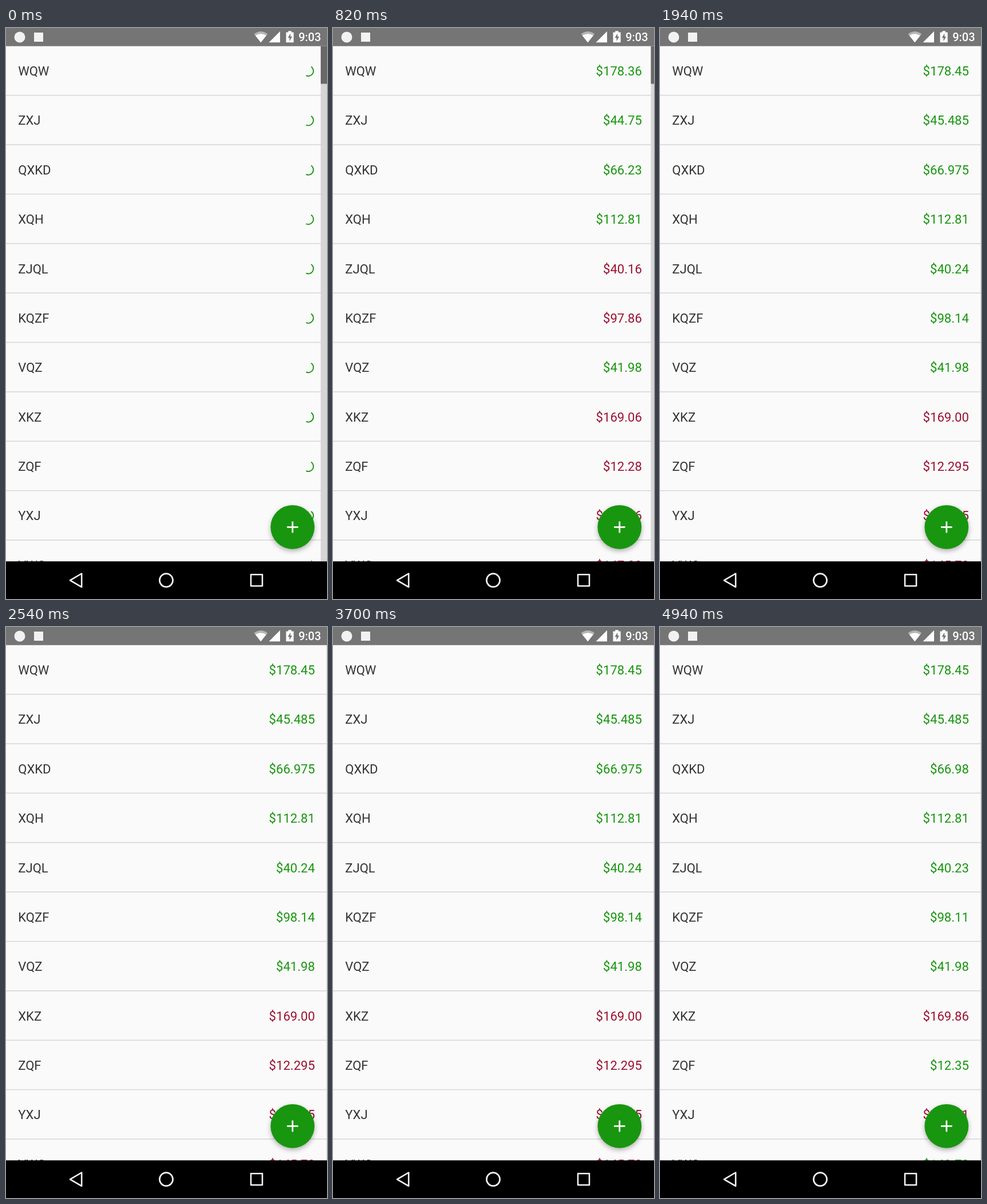
Animation, 561 px wide and 998 px high, one loop 5400 ms. Source, as an HTML page with a canvas:

```html
<!DOCTYPE html>
<html lang="en">
<head>
<meta charset="utf-8">
<title>Quotes</title>
<style>
  html, body { margin: 0; width: 100%; height: 100%; overflow: hidden; background: #000; }
  canvas { display: block; }
</style>
</head>
<body>
<canvas id="stage" width="561" height="998"></canvas>
<script>
const ctx = document.getElementById('stage').getContext('2d');
const LOOP = 5400, PITCH = 86.38, LIST_TOP = 31.5, LIST_BOTTOM = 932.4;
const GREEN = '#18960f', RED = '#9c1030';

// Symbol, then first quote and its two updates; the sign gives the colour.
const rows = `
WQW +178.36 +178.45 +178.45
ZXJ +44.75 +45.485 +45.485
QXKD +66.23 +66.975 +66.98
XQH +112.81 +112.81 +112.81
ZJQL -40.16 +40.24 +40.23
KQZF -97.86 +98.14 +98.11
VQZ +41.98 +41.98 +41.98
XKZ -169.06 -169.00 -169.86
ZQF -12.28 -12.295 +12.35
YXJ -112.16 -111.95 -112.01
VWQ -147.33 -145.70 +149.78`.trim().split('\n').map(line => line.split(' '));
const updateStarts = [60, 1300, 4500], STAGGER = 32;

const clamp = v => Math.max(0, Math.min(1, v));
const mix = (a, b, p) => a + (b - a) * p;

function rect(x, y, w, h, color) {
  ctx.fillStyle = color;
  ctx.fillRect(x, y, w, h);
}

function text(str, x, y, color, align = 'left', font = '22.1px Roboto, sans-serif') {
  ctx.font = font;
  ctx.textAlign = align;
  ctx.fillStyle = color;
  ctx.fillText(str, x, y);
}

function path(d, color, lineWidth) {
  const p = new Path2D(d);
  if (lineWidth) {
    ctx.lineWidth = lineWidth;
    ctx.strokeStyle = color;
    ctx.stroke(p);
  } else {
    ctx.fillStyle = color;
    ctx.fill(p);
  }
}

function circle(x, y, r, color) {
  ctx.beginPath();
  ctx.arc(x, y, r, 0, 7);
  ctx.fillStyle = color;
  ctx.fill();
}

function spinner(y, t) {
  const p = t / 280;
  const tail = mix(-57, 45, p) + Math.max(0, t - 280) * 0.6;
  const head = mix(115, 315, Math.min(p, 1)) + Math.max(0, t - 280) * 0.2;
  ctx.beginPath();
  ctx.arc(528.3, y, 9, tail * Math.PI / 180, head * Math.PI / 180);
  ctx.lineWidth = 1.9;
  ctx.strokeStyle = GREEN;
  ctx.stroke();
}

function list(t) {
  rect(0, LIST_TOP, 561, LIST_BOTTOM - LIST_TOP, '#fafafa');
  ctx.save();
  ctx.beginPath();
  ctx.rect(0, LIST_TOP, 561, LIST_BOTTOM - LIST_TOP);
  ctx.clip();
  rows.forEach(([symbol, ...quotes], i) => {
    const y = 83 + i * PITCH;
    text(symbol, 21.2, y, '#333');
    const version = updateStarts.filter(start => t >= start + i * STAGGER).length;
    if (version) {
      const quote = quotes[version - 1];
      text('$' + quote.slice(1), 539.9, y, quote[0] === '+' ? GREEN : RED, 'right');
    } else {
      spinner(y - 8, t);
    }
    rect(0, 116.8 + i * PITCH, 561, 1.6, '#d8d8d8');
  });
  const slide = 11 * clamp((t - 690) / 260);
  rect(Math.min(550 + slide, 560.2), LIST_TOP, 11, LIST_BOTTOM - LIST_TOP, '#d5d5d5');
  rect(550 + slide, LIST_TOP, 11, 66, '#686868');
  ctx.restore();
}

function addButton() {
  ctx.save();
  ctx.shadowColor = 'rgba(0,0,0,.3)';
  ctx.shadowBlur = 8;
  ctx.shadowOffsetY = 3.5;
  circle(500.8, 872.3, 38.4, GREEN);
  ctx.restore();
  path('M491 872.4h19.6M500.8 862.6v19.6', '#fff', 2.8);
}

function statusBar() {
  rect(0, 0, 561, LIST_TOP, '#757575');
  circle(24, 16, 9.5, '#f2f2f2');
  rect(49, 8, 16, 16, '#f2f2f2');
  path('M445.3 25.3L433.5 10.5Q445.3 1.5 457.2 10.5Z', '#b5b5b5');
  path('M445.3 25.3L435.8 13.3Q445.3 7 454.8 13.3Z', '#fff');
  path('M459.5 25.3H479V5.8Z', '#fff');
  path('M489.5 7.5h3.8v-2.2h5.6v2.2h3.8v17.8h-13.2Z', '#fff');
  path('M497.2 9.5l-4.6 7.8h2.9v5.7l4.6-8h-2.9Z', '#757575');
  text('9:03', 550.6, 23.2, '#fff', 'right', '500 20px Roboto, sans-serif');
}

function navBar() {
  rect(0, LIST_BOTTOM, 561, 998 - LIST_BOTTOM, '#000');
  ctx.lineJoin = 'round';
  path('M112 965.3L132.2 953.5V977.1Z', '#f2f2f2', 2.6);
  path('M268.4 965.3a11.6 11.6 0 1 0 23.2 0a11.6 11.6 0 1 0 -23.2 0', '#f2f2f2', 2.7);
  path('M428 955.3h20v20h-20Z', '#f2f2f2', 2.6);
}

function frame() {
  list(performance.now() % LOOP);
  addButton();
  statusBar();
  navBar();
  requestAnimationFrame(frame);
}
frame();
</script>
</body>
</html>
```
